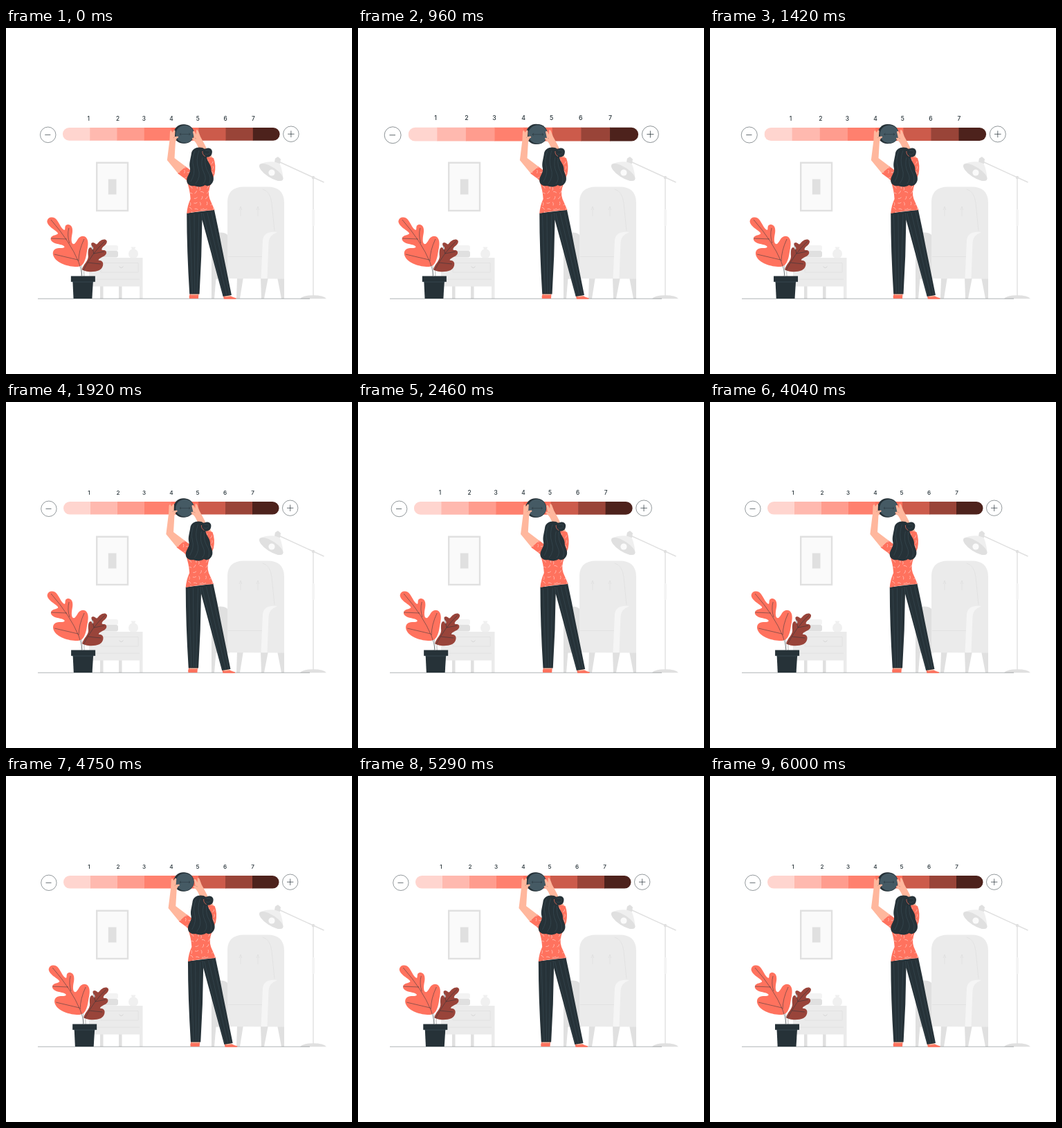
Animation, 500 px wide and 500 px high, one loop 6040 ms. Source, as an HTML page:

```html
<!DOCTYPE html>
<html lang="en">
<head>
<meta charset="utf-8">
<title>Level slider</title>
<style>
  html, body { margin: 0; width: 100%; height: 100%; overflow: hidden; background: #fff; }
  svg { display: block; width: 100%; height: 100%; }
  text { font: 500 8.2px Inter, Roboto, sans-serif; text-anchor: middle; fill: #263238; }
  .thin { fill: none; stroke: #263238; stroke-width: .5; }
  .soft { fill: none; stroke: #455a64; stroke-width: .5; }
  .seam { fill: none; stroke: #e0e0e0; stroke-width: .8; }
</style>
</head>
<body>
<svg viewBox="0 0 500 500">
  <defs>
    <clipPath id="barClip"><rect x="83" y="144" width="311.5" height="18.6" rx="9.3"/></clipPath>
    <clipPath id="shirtClip"><use href="#shirt"/></clipPath>
  </defs>

  <g id="picture">
    <rect x="131.200" y="194.700" width="44.800" height="69.300" fill="#fafafa" stroke="#e0e0e0" stroke-width="2.400"/>
    <rect x="147.800" y="218.500" width="11.700" height="22" fill="#e0e0e0"/>
  </g>

  <g id="cabinet">
    <path d="M136 372h4.500v19h-4.500zM163 372h4.500v19h-4.500z" fill="#e0e0e0"/>
    <path d="M120 332h77.500v59h-4.500v-17.500H120z" fill="#ebebeb"/>
    <path class="seam" d="M137 339.500h54v13.500h-54zM120 363h73"/>
    <path d="M163.500 344.500q3 4 6 0" fill="none" stroke="#d5d5d5"/>
    <rect x="126" y="322" width="36" height="9.500" rx="3" fill="#e0e0e0"/>
    <rect x="128" y="314" width="34" height="8" rx="3" fill="#f3f3f3"/>
    <path d="M180.500 316.500h7l-1.500 3c7 2 6 12.500 1 12.500h-6.500c-4.500-1-5-10.500 1.500-12.500z" fill="#f0f0f0"/>
  </g>

  <g id="chair">
    <path d="M297 345h8l-4 46h-4zM334 360h9l-5 31h-5zM368 360h11l-6 31h-4zM392 360h10v31h-4z" fill="#e0e0e0"/>
    <path d="M297 305q2-10 13-9.500q11 0 13 9v58h-26z" fill="#e0e0e0"/>
    <path d="M320 362V252q0-22.500 24-22.500h34q24 0 24 23v110z" fill="#ebebeb"/>
    <path class="seam" d="M321 330.500h50M371 233q11 3 13 20l4 40M339 258v14M364 258v14M337 263l2-5 2 5M362 263l2-5 2 5"/>
    <path d="M392 295q-20-2-21 12l-2.500 55h9l2-52q0-10 12.500-15z" fill="#f5f5f5"/>
  </g>

  <g id="lamp" fill="#e0e0e0">
    <path d="M425 391.200q4-5 19-5t19 5z"/>
    <path d="M444 216v171M394 193l65.500 30" fill="none" stroke="#e0e0e0" stroke-width="1.400"/>
    <rect x="442.300" y="262" width="3.600" height="24" rx="1.500" fill="#f3f3f3"/>
    <circle cx="444" cy="216" r="2.200"/>
    <path d="M366 197Q376 192 389 193.500L396 197Q400 207 400.500 218z" fill="#efefef"/>
    <path d="M389 188.500l4-2.500 4 3.500-1 7-8-3z"/>
    <ellipse cx="383.200" cy="208.500" rx="20" ry="7.500" transform="rotate(33 383.200 208.500)"/>
    <circle cx="384" cy="209" r="4.600" fill="#fafafa"/>
  </g>

  <path d="M46 391.200H439" stroke="#263238" stroke-width=".5" opacity=".75"/>

  <g id="plant">
    <path d="M109 342q2 9 0 17M114 346q-2 7-1 13" fill="none" stroke="#999" stroke-width=".7"/>
    <path d="M110 349C112 341 119 337 119 330C118.500 324 118.500 317 122.500 317C125 318 124 321 126 320C128 316 121 314 124 310.500C128 308 130 314 132 312C135 308 139 305 143 305.500C148 307 146 312 142 315C139 317 137 321 140 321C147 320 147 328 140 330.500C135 333 131 336 136 336C143 337 141 347 135 350C126 354 113 352 110 349z" fill="#99443a"/>
    <path class="thin" d="M143 308Q124 326 112 350M127 326l-3-12M127 326l15-3M118 339l19 2"/>
    <path d="M104 345C93 345.500 73 341 68.500 329C66 321 72 317.500 78 318C83 318.500 87 317 83 314.500C78 311.500 68 313 64.800 306C64 299 72 300 75 297.500C77 294 59.500 288 59.500 279C61 272 70 272 74 278C78 284 81 291 84.500 292C87 291 83 284 90.500 284C97 285 97 293 95.300 300C94 308 95 313 99 312C103 309 104 301 111 300.800C119 301 119.500 311 118 318C116.500 325 116 332 114 336C112 341 110 344 104 345z" fill="#ff725e"/>
    <path class="thin" d="M65 277Q93 309 105 338Q109 348 110 358M88 305l-23-1M92 311Q88 300 91 289M104 335l-34-8M105 337Q105 322 113 305"/>
    <path d="M96.500 366h29.500l-1.500 25H97.700z" fill="#263238"/>
    <rect x="94" y="358.500" width="35" height="8.300" fill="#263238"/>
    <path d="M96 367h30.500" class="soft"/>
  </g>

  <g id="slider">
    <g id="bar" clip-path="url(#barClip)"></g>
    <g id="digits"></g>
    <g class="thin">
      <circle cx="61.900" cy="154.300" r="11.200"/>
      <circle cx="410.700" cy="153.200" r="11.200"/>
      <path d="M57.500 154.300h8M406 153.200h9.400M410.700 148.500v9.400" stroke-width=".7"/>
    </g>
    <ellipse cx="255.800" cy="153" rx="13.600" ry="13.700" fill="#263238"/>
    <ellipse cx="258.300" cy="153" rx="13.400" ry="13.500" fill="#263238"/>
    <ellipse cx="258.300" cy="153.200" rx="13" ry="12.500" fill="#455a64"/>
    <path class="thin" d="M251 153.400h15M253 151.800l-2 1.600 2 1.600M264 151.800l2 1.600-2 1.600"/>
  </g>

  <g id="woman">
    <path d="M273 164C268 160 268 158 272 159L270 150Q271 148 273 150L275 154L275 147.500Q277 146.500 278 149L281 157Q286 166 290 174L299 188L287 196L280 178Q276 167 273 164z" fill="#ffb79d"/>
    <path d="M266 384h12.500l-.5 7h-13q-1-3 1-7zM314 388l10-1q4 2 9 3.500q0 1.500-4 1.300h-14z" fill="#ff725e"/>
    <path d="M267 384h11l-.5 2h-11zM316 387l7-1 2 2-8 1z" fill="#ffb79d"/>
    <path d="M261.300 267.500L301 262.800Q307 290 312 317L326 386L313.700 388L283.500 277Q283 330 279.600 384.500L265.300 384.500Q261.300 320 261.300 267.500z" fill="#263238"/>
    <path class="soft" d="M265.500 270l4 113M272 269l1 114M279 269l-3 114M285 268l29 117M291 267l28 119M297 266l26 119M283.500 277l-1-10" opacity=".75"/>
    <path id="shirt" d="M248 210L259.500 200L266 205L292 186L300 188Q304 198 301.500 211L296 225Q291 238 294.500 247L301.500 263Q280 264 261.300 268Q262 257 266.700 247Q266 234 261 220L257.500 217z" fill="#ff725e"/>
    <g id="pattern" clip-path="url(#shirtClip)" fill="none" stroke="#ffc7be" stroke-width=".7"></g>
    <path d="M237 151Q237 148 239 148L240.500 151L243 147.500Q245 147.500 244.500 150L244 157L248.500 156.500Q250.500 158 247 159.500L245 164L243.600 188L259.500 200L248.500 210L232.900 191L236.500 162z" fill="#ffb79d"/>
    <path class="thin" d="M244 157l-2 2M273 159l2 1" opacity=".4"/>
    <path d="M268 181C269 174 277 171 284 173C289 175 291 181 290 186C290 192 296 196 296.500 203C296 209 301 213 299.800 220C298 227 292 230 287.500 227C282 231 276 229 272 228C267 229 261 226 261.300 220C261.500 213 267 210 266 203C264 196 267 189 268 181z" fill="#263238"/>
    <path d="M283.500 179C282.500 175 287 174.500 290 174C296 172 299 177 297.700 181C297 187 289 188 287 185C284 184 283 181 283.500 179z" fill="#263238"/>
    <path class="soft" d="M273 178q-5 12-2 22t-4 22M279 177q-5 14-1 26t-4 22M284 187q-3 12 2 22t-1 16M288 188q-1 12 4 20t2 16M288 177q5-1 7 2M287 182q5 2 8-2" opacity=".8"/>
    <path d="M284 178q-.500 5 4 7.500" fill="none" stroke="#ff725e" stroke-width=".7"/>
  </g>
</svg>

<script>
  const NS = 'http://www.w3.org/2000/svg';
  const DURATION = 6040, STEPS = 145;
  const byId = id => document.getElementById(id);

  function add(parent, tag, attrs, text) {
    const el = document.createElementNS(NS, tag);
    for (const key in attrs) el.setAttribute(key, attrs[key]);
    if (text !== undefined) el.textContent = text;
    parent.appendChild(el);
  }

  ['#ffd5cf', '#ffb9af', '#ff9c8e', '#ff806e', '#ff725e', '#cc5b4b', '#994438', '#4d221c']
    .forEach((fill, i) => add(byId('bar'), 'rect', { x: 83 + 39 * i, y: 143, width: 39.5, height: 21, fill }));

  [120, 162, 199.5, 239, 277, 316.5, 356.5]
    .forEach((x, i) => add(byId('digits'), 'text', { x, y: 134 }, i + 1));

  // Scattered strokes on the shirt, on a jittered grid
  let seed = 7;
  const random = () => (seed = seed * 16807 % 2147483647) / 2147483647;
  for (let y = 192; y < 268; y += 7.5) {
    for (let x = 248; x < 304; x += 8) {
      const angle = random() * 180;
      const px = x + random() * 4, py = y + random() * 3;
      add(byId('pattern'), 'path', { d: 'M-2.5 0q2.5-1.5 5 0', transform: `translate(${px} ${py}) rotate(${angle})` });
    }
  }

  // Linear interpolation over [position, value] stops
  function track(stops, p) {
    const i = Math.max(1, stops.findIndex(stop => stop[0] >= p));
    const [p0, v0] = stops[i - 1], [p1, v1] = stops[i];
    return v0 + (v1 - v0) * (p - p0) / (p1 - p0);
  }

  const pulse = [[0, 1], [.1, 1.1], [.3, 1], [.4, 1], [.5, 1.1], [.6, 1], [1, 1]];
  const shake = [0, -1, 2, -3, 3, -3, 3, -3, 2, -1, 0].map((v, i) => [i / 10, v]);

  function draw(time) {
    const step = Math.floor((time + 6) / DURATION * STEPS) % STEPS;
    const phase = (step + 1) / STEPS;
    const scale = track(pulse, phase);
    byId('slider').setAttribute('transform', `translate(236.5 147.5) scale(${scale}) translate(-236.5 -147.5)`);
    byId('woman').setAttribute('transform', `translate(${track(shake, phase)} 0)`);
    byId('plant').setAttribute('transform', `translate(${track(shake, phase * 2 % 1)} 0)`);
  }

  const start = performance.now();
  function tick() {
    draw((performance.now() - start) % DURATION);
    requestAnimationFrame(tick);
  }
  draw(0);
  requestAnimationFrame(tick);
</script>
</body>
</html>
```
